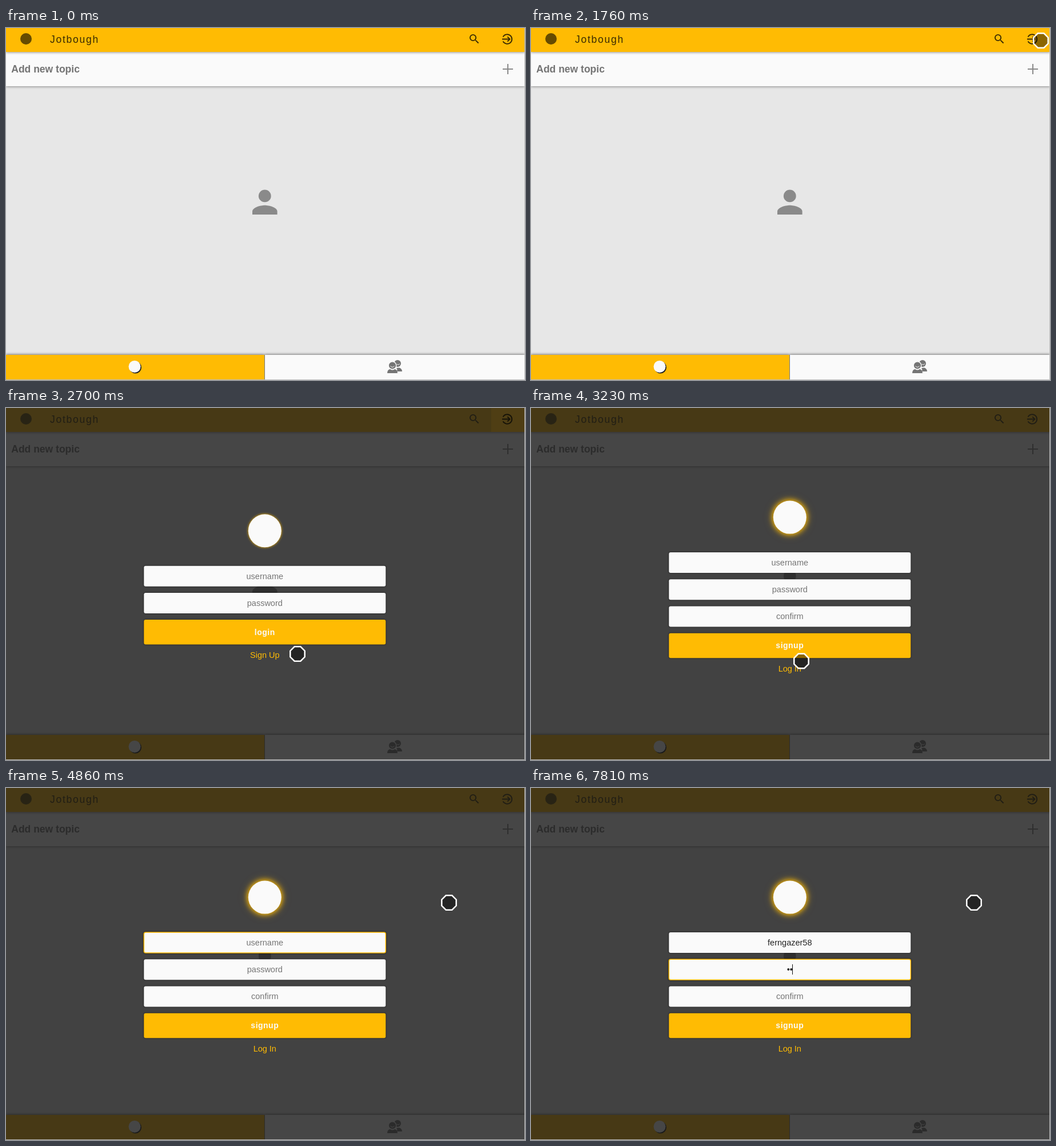
Write an HTML page that moves like this. It is 908x617 px and loops after 8000 ms.

```html
<!DOCTYPE html>
<html lang="en">
<head>
<meta charset="utf-8">
<title>Notes sign up</title>
<style>
  html, body { margin: 0; width: 100%; height: 100%; overflow: hidden; }
  svg { display: block; }
  text { font: 14.5px "Liberation Sans", Arial, sans-serif; }
  .title { font-size: 17.5px; letter-spacing: 1.75px; fill: #3a2b03; }
  .topic { font-size: 17.5px; font-weight: bold; fill: #747474; }
  .bar { fill: #fafafa; filter: drop-shadow(0 1px 2px rgba(0, 0, 0, .4)); }
  .gold { fill: #ffbb03; }
  .nav { filter: drop-shadow(0 -1px 2px rgba(0, 0, 0, .5)); }
  .mid { text-anchor: middle; }
  .hint { fill: #757575; }
  .button { font-size: 14px; font-weight: bold; letter-spacing: .5px; fill: #fafafa; }
  .box { filter: drop-shadow(0 0 1.5px rgba(0, 0, 0, .6)); }
  .exit { fill: none; stroke-width: 1.9; }
  .dim { filter: drop-shadow(0 0 2px #ffbb03); }
  .lit { filter: drop-shadow(0 0 5px #ffbb03) drop-shadow(0 0 6px rgba(255, 187, 3, .6)); }
</style>
</head>
<body>
<svg width="908" height="617" viewBox="0 0 908 617">
  <defs>
    <path id="exit" d="M869.5 15.6A8.3 8.3 0 1 1 869.5 23.4M868 19.5H881M877.3 15.3L881.5 19.5L877.3 23.7"/>
  </defs>

  <rect width="908" height="617" fill="#e7e7e7"/>
  <rect class="bar" y="42" width="908" height="60"/>
  <rect class="bar" style="fill:#ffbb03" width="908" height="42"/>
  <circle cx="35" cy="19" r="10" fill="#664b01"/>
  <text class="title" x="77" y="26.3">Jotbough</text>
  <path transform="translate(808.2 8.2) scale(.93)" fill="#3a2b03" d="M15.5 14h-.79l-.28-.27A6.47 6.47 0 0 0 16 9.5 6.5 6.5 0 1 0 9.5 16c1.61 0 3.09-.59 4.23-1.57l.27.28v.79l5 4.99L20.49 19zm-6 0a4.5 4.5 0 1 1 0-9a4.5 4.5 0 0 1 0 9z"/>
  <use href="#exit" class="exit" stroke="#3a2b03"/>
  <text class="topic" x="9.3" y="78.3">Add new topic</text>
  <path d="M869 72H887M878 63V81" stroke="#8a8a8a" stroke-width="2"/>

  <g fill="#8a8a8a">
    <circle cx="452.8" cy="294.4" r="10.9"/>
    <path d="M431 327v-5.4c0-7.2 14.5-10.9 21.8-10.9s21.8 3.6 21.8 10.9v5.4z"/>
  </g>

  <g class="nav">
    <rect class="gold" y="573" width="452" height="44"/>
    <rect x="453" y="573" width="455" height="44" fill="#fafafa"/>
  </g>
  <path d="M452.5 573V617" stroke="#777"/>
  <circle cx="226.5" cy="595" r="10.5" fill="#222"/>
  <circle cx="225" cy="593.5" r="10.5" fill="#fafafa"/>
  <g fill="#757575">
    <circle cx="685" cy="588" r="6"/>
    <path d="M684 602q1-4-1-6l5-.5q5 1.500 5 6.500z"/>
    <circle cx="676" cy="591.5" r="6.800" stroke="#fafafa" stroke-width="1.400"/>
    <path d="M667 605q0-6 5-7q4 3 8 0q5 1 5 7z"/>
    <path d="M672.500 592.500q3.500 4 7 0" fill="none" stroke="#fafafa"/>
    <path d="M684 589.500q3 2 5-1" fill="none" stroke="#fafafa"/>
  </g>

  <g id="modal">
    <rect width="908" height="617" fill="rgba(25,25,25,.8)"/>
    <g id="hover">
      <rect id="hoverBox" x="849" width="59" height="42"/>
      <use id="hoverIcon" href="#exit" class="exit"/>
    </g>
    <g id="login"></g>
    <g id="signup"></g>
    <path id="caret" stroke="#111"/>
  </g>

  <path d="M907.5 0V616.5H0" fill="none" stroke="#bdbdbd"/>
  <path id="cursor" d="M-5.300-12.700H5.300L12.700-5.300V5.300L5.300 12.700H-5.300L-12.700 5.300V-5.300Z" fill="rgba(0,0,0,.45)" stroke="#fff" stroke-width="2.500"/>
</svg>

<script>
const $ = id => document.getElementById(id);
const LOOP = 8000, MID = 452.8, GOLD = '#ffbb03';
const USER = 'ferngazer58';
const OPEN = 1840, SWITCH = 3230, FOCUS = 4320, NEXT = 7270;
const userKeys = [5400, 5550, 5700, 6160, 6240, 6410, 6480, 6650, 6720, 6950, 7040];
const passKeys = [7730, 7810];

// Cursor stops: time, x, y
const path = [
  [510, 670, 566], [900, 772, 320], [1285, 886, 16], [1750, 892, 22],
  [1827, 888, 56], [2137, 741, 377], [2370, 630, 412], [2680, 510, 431],
  [2990, 470, 440], [3190, 470, 440], [3300, 480, 452], [3765, 554, 337],
  [4000, 520, 278], [4160, 513, 269], [4300, 513, 269], [4450, 570, 300],
  [4850, 775, 201]
];
const STEP = 77.5;

const label = (y, cls, s) => `<text class="mid ${cls}" x="${MID}" y="${y}">${s}</text>`;
const box = (y, h, fill) =>
  `<rect class="box" x="241.3" y="${y}" width="423" height="${h}" rx="3" fill="${fill}"/>`;

function buildForm(id, top, glow, hints, action, link) {
  const end = top + 47.2 * hints.length;
  $(id).innerHTML =
    `<circle class="${glow}" cx="${MID}" cy="${top - 61.5}" r="29" fill="#fafafa"/>` +
    hints.map((hint, i) => {
      const y = top + 47.2 * i;
      return box(y, 36, '#fafafa') + label(y + 22.9, 'hint', hint);
    }).join('') +
    box(end, 43.5, GOLD) + label(end + 26.7, 'button', action) +
    `<g fill="${GOLD}">${label(end + 67.3, '', link)}</g>`;
}

buildForm('login', 276.7, 'dim', ['username', 'password'], 'login', 'Sign Up');
buildForm('signup', 253.1, 'lit', ['username', 'password', 'confirm'], 'signup', 'Log In');

const fields = [...$('signup').querySelectorAll('rect')];
const inputs = [...$('signup').querySelectorAll('.hint')];
const show = (id, on) => $(id).style.display = on ? '' : 'none';
const typed = (keys, t) => keys.filter(k => k <= t).length;

function fillInput(i, value, hint) {
  inputs[i].textContent = value || hint;
  inputs[i].style.fill = value ? '#222' : '';
}

function cursorAt(t) {
  const q = 510 + Math.floor((t - 510) / STEP) * STEP;
  const i = path.findIndex(p => p[0] > q);
  if (i < 0) return path[path.length - 1].slice(1);
  const [t0, x0, y0] = path[i - 1], [t1, x1, y1] = path[i];
  const k = (q - t0) / (t1 - t0);
  return [x0 + (x1 - x0) * k, y0 + (y1 - y0) * k];
}

function draw(t) {
  show('modal', t >= OPEN);
  show('login', t < SWITCH);
  show('signup', t >= SWITCH);

  const flash = t < 1990;
  show('hover', t < SWITCH);
  $('hoverBox').setAttribute('fill', flash ? '#43706e' : '#4f3e14');
  $('hoverIcon').setAttribute('stroke', flash ? '#5aa2aa' : '#151208');

  const values = [USER.slice(0, typed(userKeys, t)), '•'.repeat(typed(passKeys, t))];
  fillInput(0, values[0], 'username');
  fillInput(1, values[1], 'password');

  const active = t < FOCUS ? -1 : t < NEXT ? 0 : 1;
  for (let i = 0; i < 2; i++) {
    fields[i].setAttribute('stroke', i === active ? GOLD : 'none');
    fields[i].setAttribute('stroke-width', 1.5);
  }

  const blinkOff = t > 4800 && t < 5320;
  show('caret', active >= 0 && !blinkOff);
  if (active >= 0) {
    const half = values[active] ? inputs[active].getComputedTextLength() / 2 : 0;
    $('caret').setAttribute('d', `M${Math.floor(MID + half) + .5} ${active ? 309 : 262}v18`);
  }

  show('cursor', t >= 510);
  if (t >= 510) $('cursor').setAttribute('transform', `translate(${cursorAt(t)})`);
}

const start = performance.now();
function tick() {
  draw((performance.now() - start) % LOOP);
  requestAnimationFrame(tick);
}
tick();
</script>
</body>
</html>
```
